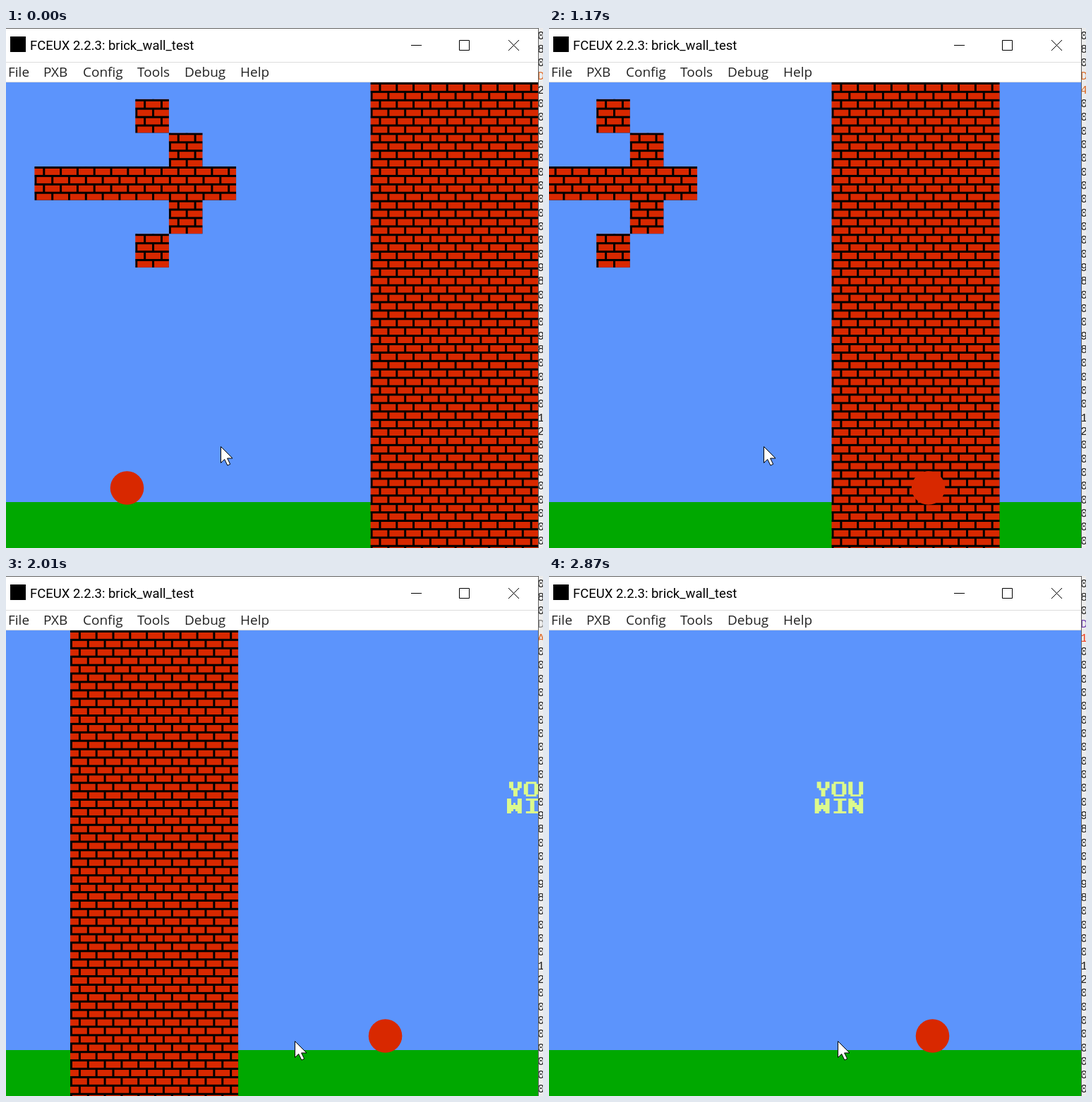
Recreate the animation shown at these times as an HTML page. Size 761 px wide and 736 px high, loop 3940 ms.

```html
<!DOCTYPE html>
<html lang="en">
<head>
<meta charset="utf-8">
<title>Brick wall game</title>
<style>
  html, body { margin: 0; width: 100%; height: 100%; overflow: hidden; background: #fff; }
  svg { display: block; width: 100vw; height: 100vh; }
  .title { font: 18.5px Roboto, sans-serif; }
  .menu { font: 19px "Open Sans", sans-serif; fill: #222; }
  .memory { font: 17px "Liberation Mono", monospace; fill: #222; }
  .line { fill: none; stroke: #000; }
</style>
</head>
<body>
<svg viewBox="0 0 761 736" preserveAspectRatio="none">
  <defs>
    <pattern id="bricks" width="8" height="8" patternUnits="userSpaceOnUse">
      <path d="M0 0h8v8h-8z"/>
      <path fill="#d82800" d="M0 1h4v3h-4zM5 1h3v3h-3zM1 5h7v3h-7z"/>
    </pattern>
    <clipPath id="screen"><path d="M0 77h754v659h-754z"/></clipPath>
  </defs>

  <rect width="761" height="736" fill="#fff"/>
  <path fill="#ececec" d="M755 0h6v736h-6z"/>
  <g id="memory" class="memory"></g>

  <rect x="6" y="12" width="22" height="22"/>
  <text class="title" x="34" y="31">FCEUX 2.2.3: brick_wall_test</text>
  <path class="line" d="M574 24.5h15M642.5 17.5h14v14h-14zM712 17l15 15M727 17l-15 15"/>
  <path fill="#dcdcdc" d="M0 48h754v1h-754zM0 76h754v1h-754z"/>
  <g id="menu" class="menu"></g>

  <g clip-path="url(#screen)">
    <rect y="77" width="754" height="595" fill="#5c94fc"/>
    <rect y="671" width="754" height="65" fill="#00a800"/>
    <g id="world">
      <g fill="url(#bricks)">
        <path d="M64 8h16v16h-16zM80 24h16v16h-16zM16 40h96v16h-96zM80 56h16v16h-16zM64 72h16v16h-16z"/>
        <path d="M176 0h80v224h-80z"/>
      </g>
      <g id="banner" fill="#dcfa8c" role="img" aria-label="YOU WIN"></g>
    </g>
    <circle id="ball" cy="651" r="23.8" fill="#d82800"/>
  </g>

  <path fill="#606060" d="M0 0h755v1h-755zM754 0h1v736h-1z"/>
  <path id="cursor" d="M.5 .5v23l5.2-5 4.2 8.6 3.8-1.8-4.1-8.3h7.4z" fill="#fff" stroke="#000"/>
</svg>
<script>
const LOOP = 3940, SCALE = 2.976, LEFT = -7.2, TOP = 77;
const $ = id => document.getElementById(id);

function add(parent, tag, attrs, text = '') {
  const node = document.createElementNS(parent.namespaceURI, tag);
  for (const key in attrs) node.setAttribute(key, attrs[key]);
  node.textContent = text;
  return parent.appendChild(node);
}

const menu = { File: 3, PXB: 53, Config: 109, Tools: 186, Debug: 253, Help: 332 };
for (const label in menu) add($('menu'), 'text', { x: menu[label], y: 69 }, label);

// Edge of the memory viewer behind the window
const special = { 1: '8', 3: 'D', 17: '9', 18: '8', 22: '9', 23: '8', 28: '1', 29: '2' };
const cells = Array.from({ length: 38 }, (_, i) =>
  add($('memory'), 'text', { x: 753, y: 15.5 + i * 19.33 }, special[i] || '0'));

const glyphs = {
  Y: 'M1 0h2v3h2v-3h2v3h-1v1h-1v3h-2v-3h-1v-1h-1z',
  O: 'M1 0h5v1h1v5h-1v1h-5v-1h-1v-5h1zM2 1v5h3v-5z',
  U: 'M0 0h2v6h3v-6h2v6h-1v1h-5v-1h-1z',
  W: 'M0 0h2v3h1v-1h1v1h1v-3h2v7h-2v-1h-1v-1h-1v1h-1v1h-2z',
  I: 'M1 0h6v1h-2v5h2v1h-6v-1h2v-5h-2z',
  N: 'M0 0h2v1h1v1h1v1h1v-3h2v7h-2v-1h-1v-1h-1v-1h-1v3h-2z'
};
['YOU', 'WIN'].forEach((word, row) => [...word].forEach((letter, col) =>
  add($('banner'), 'path', {
    d: glyphs[letter], 'fill-rule': 'evenodd',
    transform: `translate(${384 + col * 8} ${72 + row * 8})`
  })));

// Redraw times: evenly spaced bursts of seven, then two more
const ticks = [0];
for (const [from, to] of [[70, 570], [620, 1090], [1170, 1620], [1700, 2170], [2240, 2700]])
  for (let i = 0; i < 7; i++) ticks.push(Math.floor((from + (to - from) * i / 6) / 10) * 10);
ticks.push(2790, 2870);

// [tick, distance run in game pixels]
const run = [[0, 0], [11, 120], [15, 162], [20, 214], [26, 266], [33, 344], [37, 380]];

function distanceAt(tick) {
  const i = Math.max(1, run.findIndex(([end]) => tick <= end));
  const [t0, d0] = run[i - 1], [t1, d1] = run[i];
  return Math.round((d0 + (d1 - d0) * (tick - t0) / (t1 - t0)) / 2) * 2;
}

const clamp = (v, lo, hi) => Math.min(hi, Math.max(lo, v));
const tints = ['#e07030', '#d83040', '#d87030', '#d82828', '#888', '#d83030', '#7040b0'];

function draw(time) {
  const tick = ticks.findLastIndex(t => t <= time);
  const distance = distanceAt(tick);
  const camera = clamp(distance - 123, 0, 255);
  const phase = run.findLastIndex(([start]) => start <= tick);

  $('world').setAttribute('transform',
    `translate(${LEFT - camera * SCALE} ${TOP}) scale(${SCALE})`);
  $('ball').setAttribute('cx', 171.5 + (distance - camera) * SCALE);

  const glide = clamp((tick - 21) / 4, 0, 1);
  $('cursor').setAttribute('transform', `translate(${304 + 105 * glide} ${592 + 66 * glide})`);

  cells[3].style.fill = tints[phase];
  cells[4].style.fill = camera ? ['', '', '#d87030', '#d83040', '#e07030', '#889040', '#f04020'][phase] : '';
  cells[4].textContent = (Math.floor(2 + camera / 16) % 16).toString(16).toUpperCase();
}

const start = performance.now();
function frame() {
  draw((performance.now() - start) % LOOP);
  requestAnimationFrame(frame);
}
frame();
</script>
</body>
</html>
```
